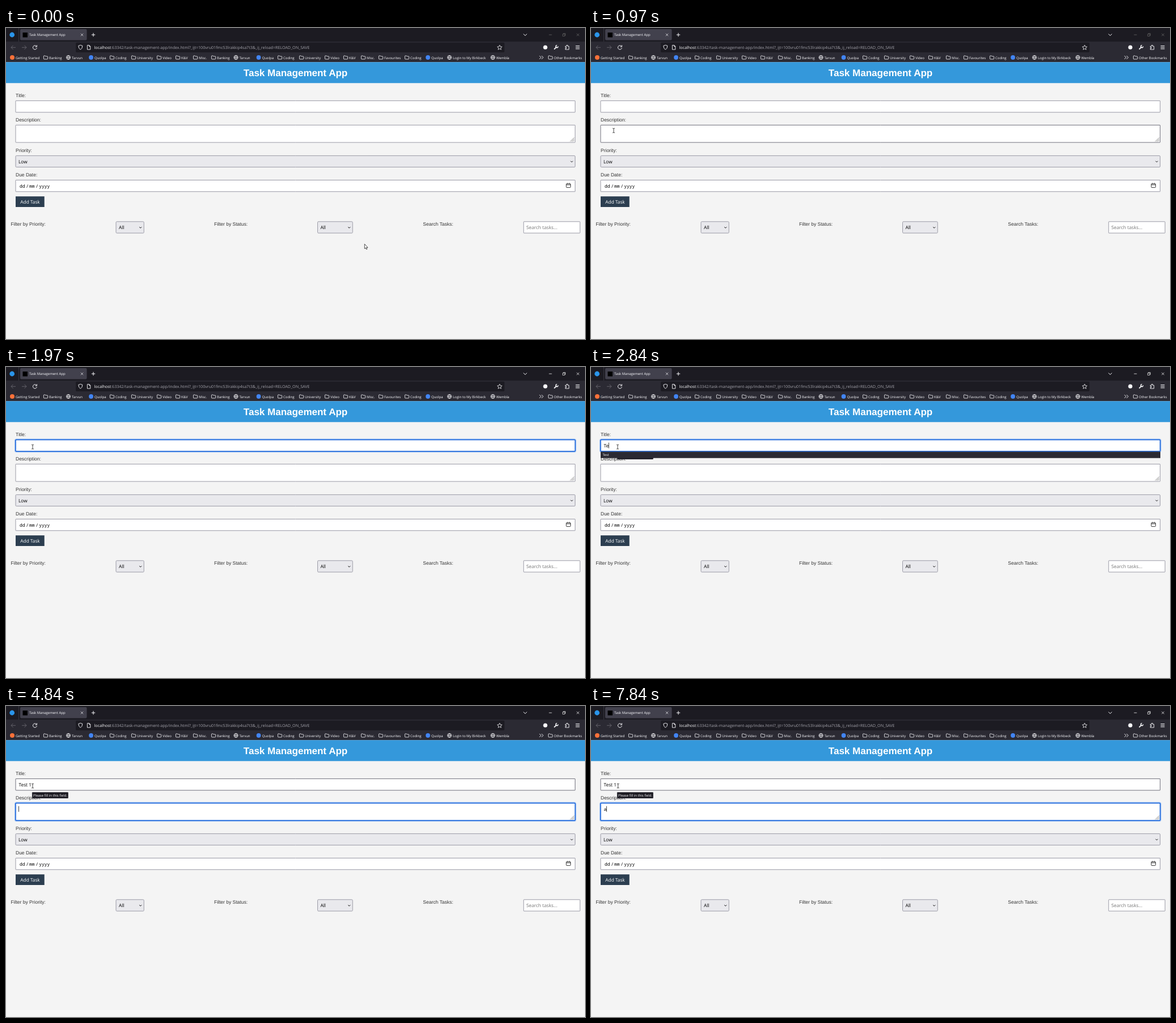
Write an HTML page with a canvas that moves like this. It is 1021 px wide and 549 px high and loops after 8000 ms.

```html
<!DOCTYPE html>
<html lang="en">
<head>
<meta charset="utf-8">
<title>Task Management App</title>
<style>
html, body { margin: 0; width: 100%; height: 100%; overflow: hidden; background: #f4f4f4; }
canvas { display: block; }
</style>
</head>
<body>
<canvas id="stage" width="1021" height="549"></canvas>
<script>
const LOOP = 8000;
const ctx = document.getElementById('stage').getContext('2d');
const UI = '"Open Sans", "Noto Sans", sans-serif';
const ARIAL = '"Liberation Sans", Arial, sans-serif';
const MONO = '"Noto Sans Mono", "DejaVu Sans Mono", monospace';
const LIGHT = '#fbfbfe';

function text(str, x, y, size, color, family = UI, weight = '', align = 'left') {
  ctx.font = `${weight} ${size}px ${family}`;
  ctx.textAlign = align;
  ctx.fillStyle = color;
  ctx.fillText(str, x, y);
  return ctx.measureText(str).width;
}

function box(x, y, w, h, fill, r = 0) {
  ctx.fillStyle = fill;
  ctx.beginPath();
  ctx.roundRect(x, y, w, h, r);
  ctx.fill();
}

function frame(x, y, w, h, color, width = 1, r = 0) {
  ctx.strokeStyle = color;
  ctx.lineWidth = width;
  ctx.beginPath();
  ctx.roundRect(x, y, w, h, r);
  ctx.stroke();
}

function dot(x, y, r, color) {
  ctx.fillStyle = color;
  ctx.beginPath();
  ctx.arc(x, y, r, 0, 7);
  ctx.fill();
}

// SVG path drawn at an offset
function path(d, x, y, stroke, width = 0.9, fill) {
  ctx.save();
  ctx.translate(x, y);
  const p = new Path2D(d);
  if (fill) { ctx.fillStyle = fill; ctx.fill(p); }
  if (stroke) { ctx.strokeStyle = stroke; ctx.lineWidth = width; ctx.stroke(p); }
  ctx.restore();
}

const CROSS = 'M-2.2 -2.2L2.2 2.2M2.2 -2.2L-2.2 2.2';

const icons = {
  folder: x => path('M-3.6 -2.2Q-3.6 -3 -2.8 -3H-1L0 -2H2.8Q3.6 -2 3.6 -1.2V2.2Q3.6 3 2.8 3H-2.8Q-3.6 3 -3.6 2.2Z', x, 52, LIGHT, 0.8),
  globe: x => path('M3.6 0A3.6 3.6 0 1 1 -3.6 0A3.6 3.6 0 1 1 3.6 0M-3.6 0H3.6M0 -3.6Q-3.2 0 0 3.6Q3.2 0 0 -3.6', x, 52, LIGHT, 0.8),
  blue: x => dot(x, 52, 3.9, '#4285f4'),
  orange: x => dot(x, 52, 4, '#ff7139')
};

const bookmarks = [
  ['orange', 7, 'Getting Started'], ['folder', 66, 'Banking'], ['globe', 106, 'Tarvun'],
  ['blue', 146, 'Quolpa'], ['folder', 183, 'Coding'], ['folder', 221, 'University'],
  ['folder', 266, 'Video'], ['folder', 299, 'K&V'], ['folder', 330, 'Misc.'],
  ['folder', 362, 'Banking'], ['globe', 401.5, 'Tarvun'], ['blue', 441.5, 'Quolpa'],
  ['folder', 479, 'Coding'], ['folder', 517, 'University'], ['folder', 562, 'Video'],
  ['folder', 595, 'K&V'], ['folder', 626, 'Misc.'], ['folder', 657, 'Favourites'],
  ['folder', 703, 'Coding'], ['blue', 740, 'Quolpa'], ['globe', 778, 'Login to My Birkbeck'],
  ['globe', 854.5, 'Wembla'], ['folder', 956, 'Other Bookmarks']
];

function browser(t) {
  box(0, 0, 1021, 24, '#1c1b22');
  box(0, 24, 1021, 36.3, '#2b2a33');
  dot(10.7, 12, 4.4, '#2a95ea');
  box(22, 0, 1, 24, '#35343d');
  box(25, 2, 117.5, 19.5, '#42414d', 2);
  box(29.5, 8, 8.5, 8.5, '#000');
  text('Task Management App', 41, 14.4, 6, LIGHT);
  path(CROSS, 134, 12, '#dcdce0', 0.8);
  path('M-3.2 0H3.2M0 -3.2V3.2', 154, 12, LIGHT, 1);
  path('M-3 -1.5L0 1.5L3 -1.5', 915.5, 12, LIGHT, 1);

  // window buttons brighten once the window is focused
  const k = Math.min(1, Math.max(0, (t - 1370) / 270));
  const g = Math.round(105 + 140 * k);
  const tone = `rgb(${g},${g},${g})`;
  path('M-2.5 0H2.5', 960, 12, tone, 0.8);
  path('M-2.4 -1.2H1.2V2.4H-2.4ZM-1.2 -1.2V-2.4H2.4V1.2H1.2', 984, 12, tone, 0.7);
  path(CROSS, 1008.5, 12, tone, 0.8);

  const arrow = 'M4 0H-4M-0.5 -3.5L-4 0L-0.5 3.5';
  path(arrow, 13, 34.3, '#696870');
  path('M-4 0H4M0.5 -3.5L4 0L0.5 3.5', 32, 34.3, '#696870');
  path('M2.6 -2.2A3.5 3.5 0 1 0 3.4 0.8M3.4 -4V-1.2H0.6', 51, 34.3, LIGHT, 1);

  box(123, 25.8, 756, 17.2, '#1c1b22', 2);
  path('M0 -4L3.5 -2.8Q3.6 2 0 4Q-3.6 2 -3.5 -2.8Z', 131.3, 34.2, LIGHT, 0.9);
  path('M-2.6 -3.8H0.8L2.8 -1.8V3.8H-2.6ZM0.6 -3.8V-1.5H2.8', 146, 34.2, LIGHT, 0.9);
  const host = text('localhost', 155.5, 36.9, 7.1, LIGHT);
  text(':63342/task-management-app/index.html?_ijt=100vru01fmc53lrakkip4sa7t3&_ij_reload=RELOAD_ON_SAVE',
    155.5 + host, 36.9, 7.1, '#a3a2aa');
  path('M0 -4.2L1.2 -1.3L4.2 -1L1.9 1L2.6 4L0 2.4L-2.6 4L-1.9 1L-4.2 -1L-1.2 -1.3Z', 870.5, 34.2, LIGHT, 0.8);
  dot(951, 34.2, 3.6, LIGHT);
  path('M-3.4 3.4L1 -1', 970, 34.2, LIGHT, 1.8);
  path('M3.6 -1.8A2.1 2.1 0 1 1 1.6 -3.7', 970, 34.2, LIGHT, 1.4);
  path('M-3.2 -2H-1V-3.8H1V-2H3.2V3.8H-3.2V1.8H-1.4V0H-3.2Z', 989.5, 34.2, LIGHT, 0.9);
  path('M-3.5 -2.6H3.5M-3.5 0H3.5M-3.5 2.6H3.5', 1008, 34.2, LIGHT, 1);

  for (const [icon, x, label] of bookmarks) {
    icons[icon](x + 4);
    text(label, x + 10, 54.6, 6, LIGHT);
  }
  path('M-3.4 -3L-0.4 0L-3.4 3M0.4 -3L3.4 0L0.4 3', 944, 52, LIGHT, 0.9);
}

function field(x, y, w, h, { focus, hover, fill = '#fff', r = 0.5 } = {}) {
  if (focus) frame(x - 0.5, y - 0.5, w + 1, h + 1, '#9cc0f3', 3, 2);
  box(x, y, w, h, fill, r);
  if (focus) frame(x, y, w, h, '#1560d8', 1.5, 1);
  else frame(x, y, w, h, hover ? '#70707c' : '#9a9aa6', 1, r);
}

function select(x, y, w, value, hover) {
  field(x, y, w, 20.2, { hover, fill: hover ? '#d0d0d7' : '#e9e9ed', r: 1.5 });
  text(value, x + 5, y + 13.5, 8.3, '#000');
  path('M-2 -1L0 1L2 -1', x + w - 6, y + 10.4, '#111', 1);
}

const label = (str, x, y) => text(str, x, y, 8.51, '#333', ARIAL);

// pointer stops during the quick move, one every 1/15 s
const stops = [
  [430, 318], [215, 240], [118, 218], [60, 208], [26, 202], [10, 196], [24, 188],
  [40, 181], [44, 173], [46, 160], [47, 148], [47, 143], [47, 141]
];
const STEP = 200 / 3;

function pointerAt(t) {
  if (t < 500) return [632, 381];
  if (t >= 6240) return [47.7, 141];
  return stops[Math.min(stops.length - 1, Math.floor((t - 500 + 4) / STEP))];
}

function inside([x, y], top, bottom) {
  return x >= 17 && x <= 1004 && y >= top && y <= bottom;
}

function pointer(p, beam) {
  if (beam) {
    path('M-2 -3.9Q0 -4 0 -3Q0 -4 2 -3.9M0 -3.4V3.4M-2 3.9Q0 4 0 3Q0 4 2 3.9', p[0], p[1], '#333', 0.9);
  } else {
    path('M0.3 0.3V8.6L2.1 7L3.4 9.8L4.8 9.2L3.5 6.5H6Z', p[0], p[1], '#222', 0.8, '#fff');
  }
}

const keys = [[2640, 'T'], [2840, 'e'], [3840, 's'], [4100, 't'], [4300, ' '], [4570, '1']];
const typedAt = t => keys.filter(k => t >= k[0]).map(k => k[1]).join('');

const blink = (t, start) => Math.floor((t - start) / 530) % 2 === 0;

function caret(x, y, h) {
  box(x, y, 0.8, h, '#111');
}

function draw(t) {
  const p = pointerAt(t);
  const lagged = pointerAt(t - STEP);
  const inTitle = inside(p, 128, 149);
  const inDesc = inside(p, 171, 202);
  const focus = t < 1440 ? '' : t < 4840 ? 'title' : 'desc';

  box(0, 0, 1021, 549, '#f4f4f4');
  browser(t);
  box(0, 60.3, 1021, 37, '#3498db');
  text('Task Management App', 510.5, 84.8, 17.02, '#fff', ARIAL, 'bold', 'center');

  label('Title:', 17, 122.2);
  label('Description:', 17, 165.2);
  label('Priority:', 17, 218.6);
  label('Due Date:', 17, 261.6);

  field(17, 128.4, 986.6, 20.4, { focus: focus === 'title', hover: inTitle });
  const titleWidth = text(typedAt(t), 22.5, 141.8, 8.3, '#000');
  if (focus === 'title' && blink(t, t < 4300 ? 1440 : 4300)) caret(22.2 + titleWidth, 133.5, 10);

  field(17, 171.4, 986.6, 30.6, { focus: focus === 'desc', hover: inDesc });
  path('M-7 0L0 -7M-4.6 0L0 -4.6M-2.2 0L0 -2.2', 1002, 200.4, '#777', 0.8);
  const descWidth = text(t >= 7840 ? 'a' : '', 22.5, 184.8, 7.9, '#000', MONO);
  if (focus === 'desc' && blink(t, t < 7840 ? 4840 : 7840)) caret(22.2 + descWidth, 176.7, 10);

  select(17, 225.4, 986.6, 'Low', inside(lagged, 225, 246) && t > 500);

  field(17, 268.5, 986.6, 20.3);
  text('dd', 24, 281.6, 7.9, '#000', MONO, 500);
  text('/', 35.2, 281.6, 7.9, '#000', MONO, 500);
  text('mm', 41, 281.6, 7.9, '#000', MONO, 500);
  text('/', 52.3, 281.6, 7.9, '#000', MONO, 500);
  text('yyyy', 58.2, 281.6, 7.9, '#000', MONO, 500);
  frame(988, 274.8, 7.6, 6.8, '#222', 0.9, 1);
  path('M0 2H7.6M2 -1.2V0.5M5.6 -1.2V0.5', 988, 274.8, '#222', 0.9);

  box(17, 297.3, 50.7, 18.7, '#2c3e50');
  text('Add Task', 25.3, 309.8, 8.3, '#fff');

  label('Filter by Priority:', 8.5, 348.8);
  select(194, 341.8, 49.2, 'All');
  label('Filter by Status:', 367, 348.8);
  select(549.5, 341.8, 61.7, 'All');
  label('Search Tasks:', 735.3, 348.8);
  field(912.8, 341.8, 99.4, 20.2);
  text('Search tasks...', 917.5, 355.3, 8.3, '#757575');

  if (t >= 2170) {
    box(46, 152.2, 63.7, 10.7, '#1c1b22', 1);
    frame(46.3, 152.5, 63.1, 10.1, '#4b4a55', 0.6, 1);
    text('Please fill in this field.', 48, 159.8, 6, LIGHT);
  }
  if (t >= 2700 && t < 4640) {
    box(17, 149.6, 987, 11.2, '#2b2a33');
    text('Test', 20.5, 157.4, 5.9, LIGHT);
  }
  pointer(p, inTitle || inDesc);
}

ctx.textRendering = 'geometricPrecision';

function tick() {
  draw(performance.now() % LOOP);
  requestAnimationFrame(tick);
}
tick();
</script>
</body>
</html>
```
